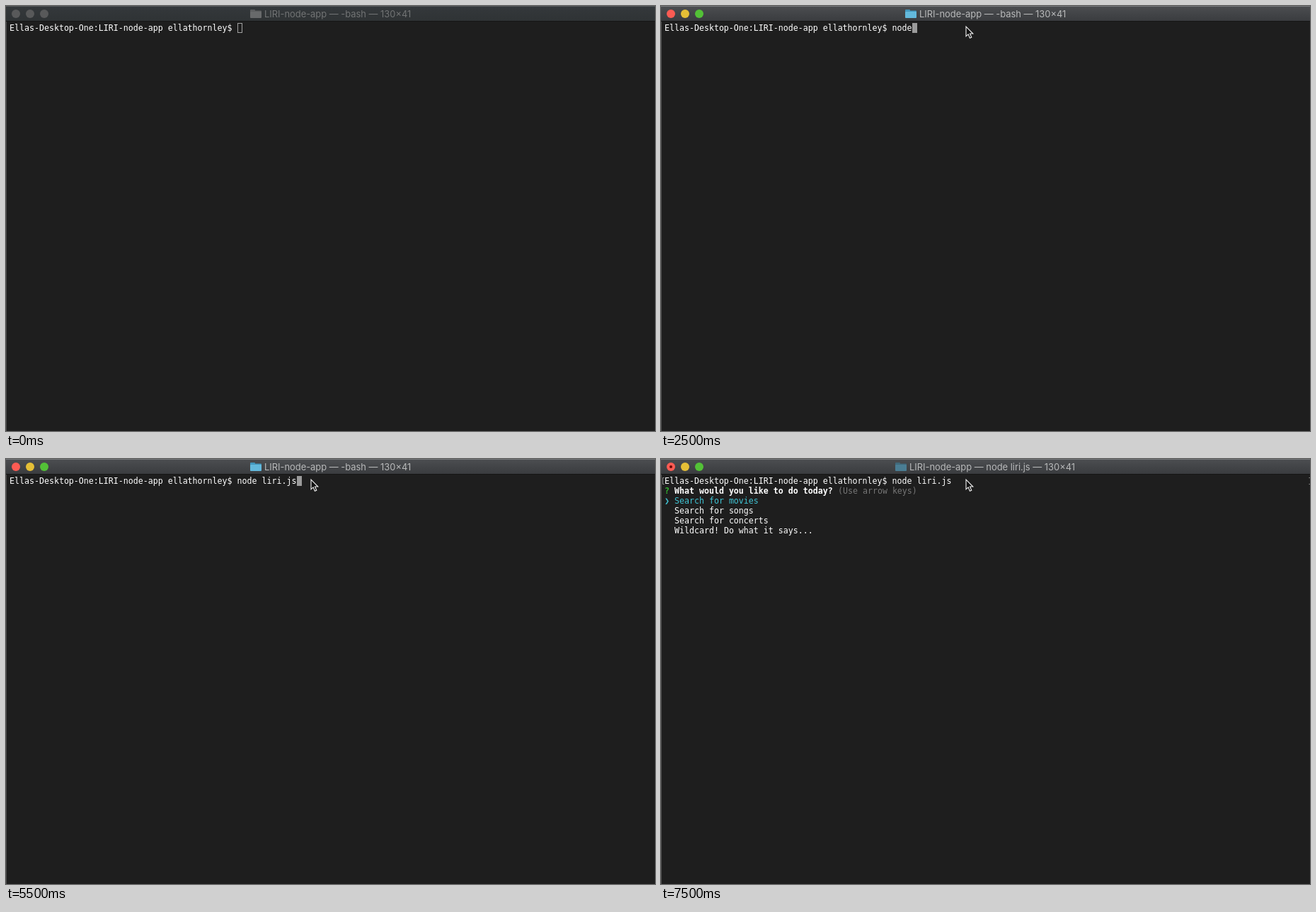
These frames come from a looping animation (917 by 600 pixels, 8 s). An HTML page with a canvas:

```html
<!DOCTYPE html>
<html lang="en">
<head>
<meta charset="utf-8">
<title>Terminal</title>
<style>
html, body { margin: 0; width: 100%; height: 100%; overflow: hidden; background: #1e1e1e; }
canvas { display: block; }
</style>
</head>
<body>
<canvas id="stage" width="917" height="600"></canvas>
<script>
const ctx = document.getElementById("stage").getContext("2d");
const LOOP = 8000, CELL = 7, LINE = 14, LEFT = 5, TOP = 24;
const PROMPT = "Ellas-Desktop-One:LIRI-node-app ellathornley$ ";
const COMMAND = "node liri.js";
// Time at which each character of the command appears
const KEYS = [2000, 2250, 2500, 2500, 3750, 3750, 4000, 4000, 4250, 4500, 5250, 5500];
const FOCUS = 1000, ENTER = 6250, RUN = 6500, MENU = 7000;

function rect(x, y, w, h, color) {
  ctx.fillStyle = color;
  ctx.fillRect(x, y, w, h);
}

function disc(x, y, r, color) {
  ctx.fillStyle = color;
  ctx.beginPath();
  ctx.arc(x, y, r, 0, 7);
  ctx.fill();
}

function write(text, col, row, color = "#fff", weight = 400) {
  ctx.font = `${weight} 11.628px "DejaVu Sans Mono", monospace`;
  ctx.fillStyle = color;
  ctx.fillText(text, LEFT + col * CELL, TOP + row * LINE + 11);
}

function folder(x, front, back) {
  ctx.fillStyle = back;
  ctx.beginPath();
  ctx.roundRect(x, 5, 7, 5, 1);
  ctx.roundRect(x, 6.5, 16, 5, 1);
  ctx.fill();
  ctx.fillStyle = front;
  ctx.beginPath();
  ctx.roundRect(x, 8, 16, 9, 1);
  ctx.fill();
}

function titleBar(active, running) {
  const shade = ctx.createLinearGradient(0, 1, 0, 21);
  shade.addColorStop(0, active ? "#4b4d50" : "#34383b");
  shade.addColorStop(1, active ? "#3a3c3f" : "#2f3335");
  rect(0, 0, 917, 21, shade);
  rect(0, 0, 917, 1, active ? "#77797b" : "#55585a");
  rect(0, 21, 917, 1, "#151515");

  const lights = active ? ["#fc5b53", "#e5bf36", "#53c137"] : Array(3).fill("#58595a");
  lights.forEach((color, i) => disc(14 + 20 * i, 11, 6, color));
  if (running) disc(14, 11, 2, "#6b0806");

  const x = running ? 331 : 345;
  if (!active) folder(x, "#686a6b", "#5c5e5f");
  else if (running) folder(x, "#4a7d93", "#40697b");
  else folder(x, "#63b9dc", "#4297bd");

  ctx.font = '12.9px Inter, "Liberation Sans", sans-serif';
  ctx.fillStyle = active ? "#b9babb" : "#727475";
  ctx.fillText(`LIRI-node-app — ${running ? COMMAND : "-bash"} — 130×41`, x + 20, 16);
}

function bracket(x, dir) {
  ctx.strokeStyle = "#8c8c8c";
  ctx.lineWidth = 1;
  ctx.beginPath();
  ctx.moveTo(x + 2 * dir, 26.5);
  ctx.lineTo(x, 26.5);
  ctx.lineTo(x, 35.5);
  ctx.lineTo(x + 2 * dir, 35.5);
  ctx.stroke();
}

function caret(col, row, solid) {
  const x = LEFT + col * CELL, y = TOP + row * LINE;
  if (solid) return rect(x, y, CELL, LINE, "#9b9b9b");
  ctx.strokeStyle = "#a2a2a2";
  ctx.lineWidth = 1;
  ctx.strokeRect(x + 0.5, y + 0.5, CELL - 1, LINE - 1);
}

function menu() {
  write("?", 0, 1, "#32b52f", 700);
  write("What would you like to do today?", 2, 1, "#fff", 700);
  write("(Use arrow keys)", 35, 1, "#767676");
  write("❯", 0, 2, "#40c4d4", 700);
  write("Search for movies", 2, 2, "#40c4d4");
  ["Search for songs", "Search for concerts", "Wildcard! Do what it says..."]
    .forEach((text, i) => write(text, 2, 3 + i));
}

function pointer(x, y) {
  ctx.save();
  ctx.translate(x, y);
  ctx.beginPath();
  [[.5, .8], [.5, 14.5], [3.6, 11.6], [5.9, 17], [8.3, 16], [6, 10.7], [10.3, 10.7]]
    .forEach(p => ctx.lineTo(...p));
  ctx.closePath();
  ctx.fillStyle = "#111";
  ctx.fill();
  ctx.strokeStyle = "#f2f2f2";
  ctx.lineWidth = 1.1;
  ctx.stroke();
  ctx.restore();
}

function draw(t) {
  const active = t >= FOCUS, entered = t >= ENTER;
  const typed = KEYS.filter(key => t >= key).length;

  rect(0, 0, 917, 600, "#1e1e1e");
  rect(0, 21, 1, 579, "#4a4a4a");
  titleBar(active, t >= RUN);

  write(PROMPT + COMMAND.slice(0, typed), 0, 0);
  if (entered) {
    bracket(2.5, 1);
    bracket(917.5, -1);
  }
  if (t >= MENU) menu();
  else if (entered) caret(0, 1, true);
  else caret(PROMPT.length + typed, 0, active);

  if (t >= 750) pointer(430.5, 28.3);
  else if (t >= 500) pointer(498.5, 44.3);
}

function tick(now) {
  draw(now % LOOP);
  requestAnimationFrame(tick);
}
tick(performance.now());
</script>
</body>
</html>
```
